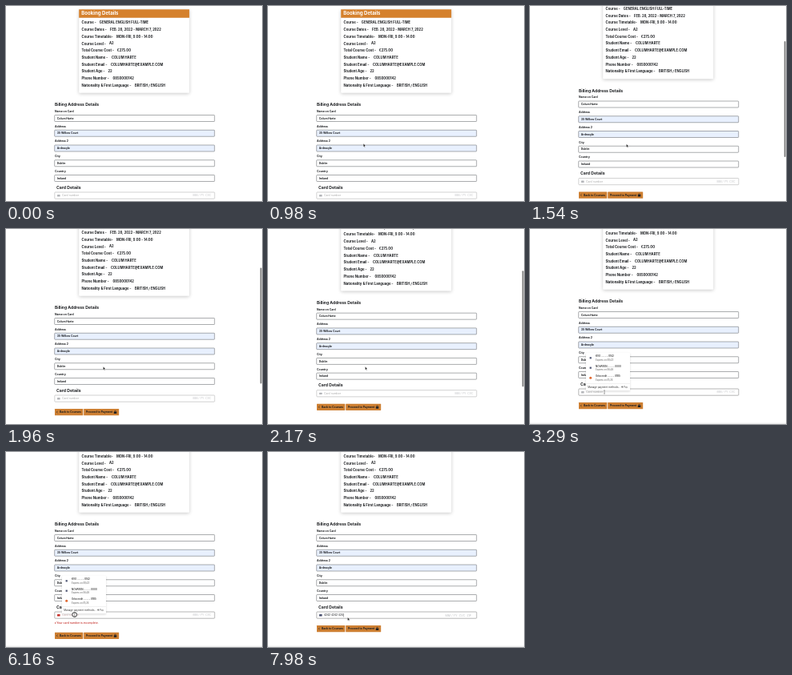
An HTML page with a canvas for the animation above (8000 ms loop, 320 by 244 pixels).

```html
<!DOCTYPE html>
<html lang="en">
<head>
<meta charset="utf-8">
<title>Booking checkout</title>
<style>
  html, body { margin: 0; width: 100%; height: 100%; overflow: hidden; background: #fff; }
  canvas { display: block; width: 320px; height: 244px; }
</style>
</head>
<body>
<canvas id="stage"></canvas>
<script>
const W = 320, H = 244, LOOP = 8000, STEP = 70;
const INK = '#1d1f22', ORANGE = '#d5812d', RED = '#c5302b';
const FONT = 'Inter, sans-serif';

const canvas = document.getElementById('stage');
const ctx = canvas.getContext('2d');
const dpr = window.devicePixelRatio || 1;
canvas.width = W * dpr;
canvas.height = H * dpr;

// label, value, x of value
const booking = [
  ['Course -', 'GENERAL ENGLISH FULL-TIME', 116.8],
  ['Course Dates -', 'FEB. 28, 2022 - MARCH 7, 2022', 130],
  ['Course Timetable-', 'MON-FRI, 9.00 - 14.00', 138],
  ['Course Level -', 'A2', 129],
  ['Total Course Cost -', '€275.00', 138.8],
  ['Student Name -', 'COLUM HARTE', 132],
  ['Student Email -', 'COLUMHARTE@EXAMPLE.COM', 131],
  ['Student Age -', '22', 127.5],
  ['Phone Number -', '0850000142', 133.5],
  ['Nationality & First Language -', 'BRITISH / ENGLISH', 161]
];

const fields = [
  ['Name on Card', 'Colum Harte'],
  ['Address', '35 Willow Court', true],
  ['Address 2', 'Ardmoyle', true],
  ['City', 'Dublin'],
  ['Country', 'Ireland']
];

const savedCards = [
  ['KVO - - - - 0142', '08/23', '#4a5170'],
  ['NOVAREN - - - - 0000', '06/26', '#4a5170'],
  ['Orbicredit - - - - 0185', '01/24', '#e0672f']
];

// [time, value...] keys
const scrollKeys = [[980, 0], [1120, 2], [1330, 9], [1540, 17.5], [1610, 18],
  [1820, 18], [1890, 21], [1960, 25], [2100, 30.5], [2310, 33]];
const pointerKeys = [[910, 119.3, 172.3], [1050, 119.3, 172.3], [1540, 120.5, 172.8],
  [1680, 120.5, 172.8], [1750, 121.5, 172.3], [2240, 121.5, 172.3], [2660, 104, 198],
  [2800, 102, 200], [3010, 93, 204], [4200, 93, 204], [4970, 90, 204],
  [5600, 85.7, 203.5], [6440, 85.7, 203.5], [7210, 99.5, 207]];

function keyed(keys, t) {
  const last = keys.length - 1;
  if (t <= keys[0][0]) return keys[0].slice(1);
  if (t >= keys[last][0]) return keys[last].slice(1);
  const i = keys.findIndex(k => k[0] > t);
  const a = keys[i - 1], b = keys[i];
  const p = (t - a[0]) / (b[0] - a[0]);
  return a.slice(1).map((v, n) => v + (b[n + 1] - v) * p);
}

// y is the middle of the capitals
function text(str, x, y, size, color = INK, weight = 700) {
  ctx.font = `${weight} ${size}px ${FONT}`;
  ctx.fillStyle = color;
  ctx.fillText(str, x, y + size * 0.36);
}

function rect(x, y, w, h, fill, stroke, radius = 0, line = 0.6) {
  ctx.beginPath();
  ctx.roundRect(x, y, w, h, radius);
  if (fill) { ctx.fillStyle = fill; ctx.fill(); }
  if (stroke) { ctx.strokeStyle = stroke; ctx.lineWidth = line; ctx.stroke(); }
}

function dot(x, y, r, color) {
  ctx.beginPath();
  ctx.arc(x, y, r, 0, Math.PI * 2);
  ctx.fillStyle = color;
  ctx.fill();
}

function polyline(points, color, width) {
  ctx.beginPath();
  points.forEach(([x, y]) => ctx.lineTo(x, y));
  ctx.strokeStyle = color;
  ctx.lineWidth = width;
  ctx.stroke();
}

function raised(x, y, w, h, blur, alpha, radius) {
  ctx.save();
  ctx.shadowColor = `rgba(0,0,0,${alpha})`;
  ctx.shadowBlur = blur * dpr;
  ctx.shadowOffsetY = dpr;
  rect(x, y, w, h, '#fff', null, radius);
  ctx.restore();
}

function drawBooking() {
  raised(91.2, 4.2, 138, 104.6, 4, 0.22, 1);
  rect(91.2, 4.2, 138, 10.5, ORANGE);
  text('Booking Details', 94.2, 9.2, 6.1, '#fff');
  booking.forEach(([label, value, x], i) => {
    const y = 20.8 + i * 8.73;
    text(label, 94.5, y, 4.3);
    text(value, x, y, 4.15);
  });
}

function drawBilling() {
  text('Billing Address Details', 61, 123.6, 5.05);
  fields.forEach(([label, value, filled], i) => {
    const y = 131.6 + i * 18.75;
    text(label, 61, y, 3.45);
    rect(60.7, y + 4.9, 200, 8, filled ? '#e8f0fe' : '#fff', '#55585c', 0.7, 0.5);
    text(value, 63.8, y + 8.9, 3.4);
  });
}

function drawCardField(s) {
  text('Card Details', 63, 226.9, 5.15);
  rect(60.8, 233, 200, 8.2, '#fff', s.focus ? '#858585' : '#b4b4b4', 0.8);
  const number = '4242424242424242'.slice(0, s.digits).replace(/(.{4})(?=.)/g, '$1 ');
  const icon = s.error ? RED : s.digits ? '#4a5170' : '#b4b6ba';
  rect(64, 236, 3.6, 2.4, icon, null, 0.5);
  if (number) {
    text(number, 70, 237.2, 3.2, '#33363a', 500);
    if (s.caret) rect(70.4 + ctx.measureText(number).width, 235, 0.4, 4.4, '#333');
  } else {
    text('Card number', 70, 237.2, 3.4, s.error ? '#d9b9b9' : '#aaa', 400);
  }
  if (s.zip) text('MM / YY  CVC  ZIP', 221.5, 237.2, 3.7, '#c0c2c5', 400);
  else text('MM / YY  CVC', 233.5, 237.2, 3.4, '#c0c2c5', 400);
}

function drawButtons(s) {
  if (s.error) {
    dot(61.7, 247, 0.7, RED);
    text('Your card number is incomplete.', 63.2, 247, 3.4, RED, 500);
  }
  const y = s.error ? 258.7 : 250;
  const mid = y + 4.1;
  rect(61, y, 35.3, 8.3, '#cd7f32', null, 0.4);
  rect(97.2, y, 44, 8.3, '#cd7f32', null, 0.4);
  polyline([[64.5, mid - 1.3], [63.3, mid], [64.5, mid + 1.3]], INK, 0.6);
  text('Back to Courses', 67, mid, 3.4);
  text('Proceed to Payment', 100, mid, 3.4);
  rect(134.8, mid - 0.6, 3.5, 2.6, INK, null, 0.4);
  ctx.beginPath();
  ctx.arc(136.55, mid - 0.6, 1.1, Math.PI, 0);
  ctx.strokeStyle = INK;
  ctx.lineWidth = 0.6;
  ctx.stroke();
  rect(0, 275.8, W, 0.6, '#dedede');
}

function drawMenu() {
  raised(70, 155, 55, 47.3, 2.5, 0.18, 0.8);
  savedCards.forEach(([name, expiry, color], i) => {
    const y = 159.2 + i * 12.4;
    if (i < 2) rect(74.6, y + 1, 2.2, 2.2, color);
    else dot(75.7, y + 2.2, 1.5, color);
    text(name, 82, y, 3, '#222', 500);
    text('Expires on ' + expiry, 82, y + 4.6, 2.75, '#555', 400);
  });
  rect(70, 193, 55, 0.4, '#e3e3e3');
  text('Manage payment methods...', 72.2, 197.7, 3.05, '#333', 400);
  dot(115.3, 197.6, 1.1, '#777');
  text('Pay', 117.2, 197.7, 2.8, '#666', 500);
}

function drawArrow(x, y) {
  ctx.beginPath();
  [[0, 0], [0, 3.8], [0.9, 3.1], [1.5, 4.4], [2.1, 4.1], [1.6, 2.8], [2.7, 2.7]]
    .forEach(([dx, dy]) => ctx.lineTo(x + dx, y + dy));
  ctx.closePath();
  ctx.fillStyle = '#111';
  ctx.fill();
  ctx.strokeStyle = '#fff';
  ctx.lineWidth = 0.3;
  ctx.stroke();
}

function drawBeam(x, y) {
  polyline([[x - 0.8, y - 2.1], [x + 0.8, y - 2.1]], '#555', 0.5);
  polyline([[x, y - 2.1], [x, y + 2.1]], '#555', 0.5);
  polyline([[x - 0.8, y + 2.1], [x + 0.8, y + 2.1]], '#555', 0.5);
}

function drawRing(x, y) {
  ctx.beginPath();
  ctx.arc(x, y, 2.9, 0, Math.PI * 2);
  ctx.fillStyle = 'rgba(255,255,255,.7)';
  ctx.fill();
  ctx.strokeStyle = '#222';
  ctx.lineWidth = 0.9;
  ctx.stroke();
  drawBeam(x, y);
}

function drawPointer(t) {
  if (t < 910) return;
  const [x, y] = keyed(pointerKeys, t);
  if (t < 3010 || t >= 6860) drawArrow(x, y);
  else if (t >= 5600 && t < 6440) drawRing(x, y);
  else drawBeam(x, y);
}

function drawScrollbar(t, scroll) {
  if (t < 1050 || t >= 3010) return;
  ctx.globalAlpha = t < 2800 ? 1 : 1 - (t - 2730) / 280;
  rect(317.7, 33.5 + scroll * 0.6, 1.8, 145, '#7c7c7c', null, 0.9);
  ctx.globalAlpha = 1;
}

function draw(t) {
  const [scroll] = keyed(scrollKeys, t);
  const state = {
    focus: t >= 3150,
    error: t >= 5040 && t < 6510,
    digits: t < 6580 ? 0 : Math.min(11, 1 + Math.floor((t - 6580) / 140)),
    zip: t >= 7280,
    caret: t >= 7910
  };
  ctx.setTransform(dpr, 0, 0, dpr, 0, 0);
  ctx.fillStyle = '#fff';
  ctx.fillRect(0, 0, W, H);
  ctx.save();
  ctx.translate(0, -scroll);
  drawBooking();
  drawBilling();
  drawCardField(state);
  drawButtons(state);
  ctx.restore();
  if (t >= 3150 && t < 6440) drawMenu();
  drawScrollbar(t, scroll);
  drawPointer(t);
}

const start = performance.now();
function tick() {
  const t = (performance.now() - start) % LOOP;
  draw(Math.floor(t / STEP) * STEP);
  requestAnimationFrame(tick);
}
tick();
</script>
</body>
</html>
```
